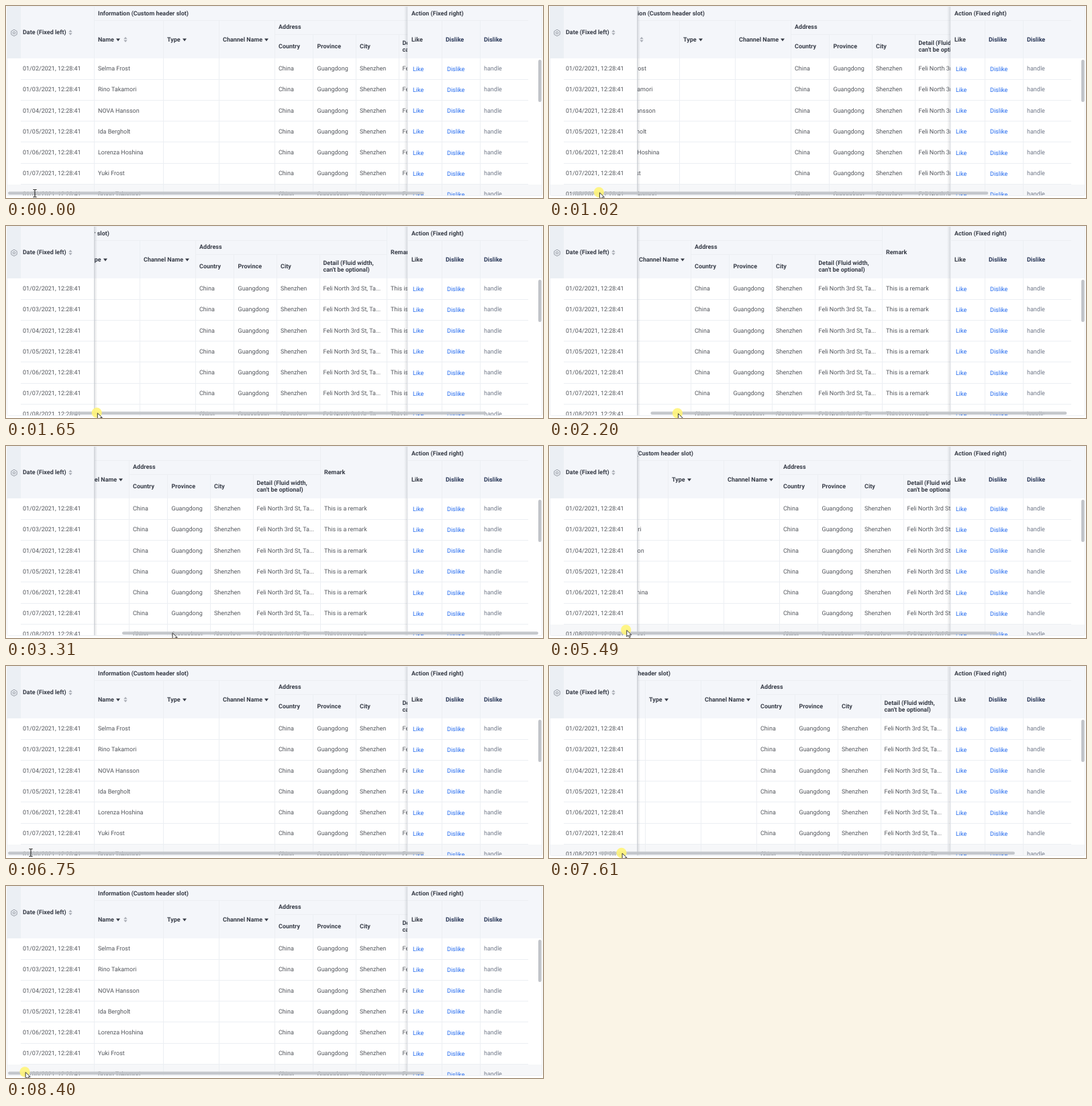
An HTML page for the animation above (8480 ms loop, 800 by 286 pixels).

```html
<!DOCTYPE html>
<html lang="en">
<head>
<meta charset="utf-8">
<title>Table with fixed columns</title>
<style>
  html, body { margin: 0; width: 800px; height: 286px; overflow: hidden; background: #fff; }
  svg { display: block; }
  text { font: 9px Roboto, sans-serif; fill: #53565c; white-space: pre; text-rendering: geometricPrecision; }
  .head { font-weight: 600; fill: #383d48; }
  .navy { font-weight: 600; fill: #2a3858; }
  .link { fill: #2068ee; }
  .soft { fill: #727a8a; }
  .rule { stroke: #eceff3; fill: none; }
  .bar { fill: #c1c4c9; }
</style>
</head>
<body>
<svg id="stage" width="800" height="286" viewBox="0 0 800 286"></svg>
<script>
const HEAD = 78, ROW = 31.2, LEFT = 131, RIGHT = 598, MAX_THUMB = 170, MAX_SCROLL = 217;
const STEPS = 108, LOOP = 8480, STEP = LOOP / STEPS;
const names = ['Selma Frost', 'Rino Takamori', 'NOVA Hansson', 'Ida Bergholt',
  'Lorenza Hoshina', 'Yuki Frost', 'Bruno Takamori'];

const label = (x, y, s, cls = '') => `<text x="${x}" y="${y + 3.2}" class="${cls}">${s}</text>`;
const head = (x, y, s) => label(x, y, s, 'head');
const box = (x, y, w, h, fill) => `<rect x="${x}" y="${y}" width="${w}" height="${h}" fill="${fill}"/>`;
const hLine = (x1, x2, y) => `<path class="rule" d="M${x1} ${Math.floor(y) + .5}H${x2}"/>`;
const vLine = (x, y1, y2 = 282) => `<path class="rule" d="M${x + .5} ${y1}V${y2}"/>`;
const caret = (x, y) => `<path fill="#343944" d="M${x - 3} ${y - 1.5}h6l-3 4z"/>`;
const sorter = (x, y) =>
  `<path fill="#a9adb5" d="M${x - 2.7} ${y - .8}h5.4l-2.7-3.2zM${x - 2.7} ${y + .8}h5.4l-2.7 3.2z"/>`;
const rows = cells => names.map((name, i) => cells(HEAD + 15 + i * ROW, name, i)).join('');
const rowLines = (x1, x2) => names.slice(1).map((_, i) => hLine(x1, x2, HEAD + (i + 1) * ROW)).join('');
const panel = (x, w) => box(x, 0, w, HEAD, '#f4f6fa') + box(x, HEAD, w, 205, '#fff') +
  `<rect class="hover" x="${x}" y="266" width="${w}" height="17" fill="#f6f7f9"/>`;

const middle = panel(LEFT, 684) + rowLines(LEFT, 815) +
  hLine(LEFT, 685, 21) + hLine(400, 685, 42) +
  [234, 317, 400].map(x => vLine(x, 21)).join('') +
  [457, 521, 585].map(x => vLine(x, 42)).join('') + vLine(685, 0) +
  head(137, 11, 'Information (Custom header slot)') +
  head(137, 50, 'Name') + caret(167, 50) + sorter(178, 50) +
  head(240, 50, 'Type') + caret(266, 50) +
  head(323, 50, 'Channel Name') + caret(388, 50) +
  head(406, 31, 'Address') + head(406, 60, 'Country') + head(463.5, 60, 'Province') +
  head(527, 60, 'City') + head(590.5, 55, 'Detail (Fluid width,') +
  head(590.5, 65, 'can\'t be optional)') + head(691, 39, 'Remark') +
  rows((y, name) => label(137, y, name) + label(406, y, 'China') + label(463.5, y, 'Guangdong') +
    label(527, y, 'Shenzhen') + label(590.5, y, 'Feli North 3rd St, Ta...') +
    label(691, y, 'This is a remark'));

const gear = `<g fill="none" stroke="#8d929c" stroke-width=".9"><circle cx="12" cy="40" r="1.7"/>
  <path d="M12 35.2l4.2 2.4v4.8L12 44.8l-4.2-2.4v-4.8z"/></g>`;
const leftPanel = panel(2, LEFT - 2) + box(2, 0, 20, HEAD, '#ebeff4') + gear + rowLines(22, LEFT) +
  vLine(LEFT, 0) + head(25, 39, 'Date (Fixed left)') + sorter(96, 39.5) +
  rows((y, _, i) => label(25, y, `01/0${i + 2}/2021, 12:28:41`));

const rightPanel = panel(RIGHT, 200) + rowLines(RIGHT, 778) + hLine(RIGHT, 778, 21) +
  vLine(RIGHT, 0) + vLine(649, 21) + vLine(706, 21) +
  head(604, 11, 'Action (Fixed right)') + head(604, 50, 'Like') +
  label(655, 50, 'Dislike', 'navy') + label(712, 50, 'Dislike', 'navy') +
  rows(y => label(606, y + .6, 'Like', 'link') + label(657, y + .6, 'Dislike', 'link') +
    label(712, y, 'handle', 'soft'));

const fade = (id, from, to) => `<linearGradient id="${id}">
  <stop stop-color="#39404d" stop-opacity="${from}"/>
  <stop offset="1" stop-color="#39404d" stop-opacity="${to}"/></linearGradient>`;

const $ = id => document.getElementById(id);
$('stage').innerHTML = `
  <defs>${fade('out', .18, 0)}${fade('in', 0, .15)}
    <clipPath id="table"><rect x="1" width="798" height="282.5"/></clipPath>
    <clipPath id="view"><rect x="${LEFT}" width="${RIGHT - LEFT}" height="283"/></clipPath></defs>
  <g clip-path="url(#table)">
    <g clip-path="url(#view)"><g id="middle">${middle}</g></g>
    ${leftPanel}${rightPanel}
    <g id="leftShade">${box(LEFT, 0, 5, 283, 'url(#out)')}</g>
    ${box(RIGHT - 5, 0, 5, 283, 'url(#in)')}
  </g>
  <path class="rule" d="M1.5 0V280.5q0 2 2 2H796.5q2 0 2-2V0M1 .5H799"/>
  <rect class="bar" x="793" y="80" width="4.6" height="63" rx="2.3"/>
  <rect class="bar" id="thumb" y="276.5" width="620" height="4.6" rx="2.3" opacity=".93"/>
  <g id="cursor">
    <circle id="press" cy=".3" r="7.6" fill="#fff47a" opacity=".9"/>
    <path id="arrow" transform="translate(.6 .5)" d="M.5 .5V10L2.8 8 4.3 11.3 6 10.5 4.6 7.3H7.6Z"
      fill="#fff" stroke="#222" stroke-width=".9"/>
    <path id="beam" d="M-2.5-5.5H-.7L0-5 .7-5.5H2.5M0-5V5M-2.5 5.5H-.7L0 5 .7 5.5H2.5" fill="none" stroke="#111"/>
  </g>`;

// Pointer path: step, x, y
const path = [[0, 43, 279], [2, 43, 277], [4, 43, 277], [8, 53, 277], [13, 74.3, 277], [14, 79, 277],
  [28, 191.4, 278.5], [35, 247, 277.5], [42, 247, 277.5], [47, 246, 278], [50, 246, 275.5],
  [56, 246, 275.5], [57, 240, 276], [58, 240, 276], [59, 218, 276], [60, 218, 276],
  [70, 114.7, 273.5], [76, 12, 263], [80, 12, 263], [83, 25, 252], [86, 37, 278], [91, 37, 278],
  [97, 108, 278], [99, 108, 278], [107, 28, 276.5]];

function pointer(n) {
  const i = Math.max(1, path.findIndex(p => p[0] >= n));
  const [a, b] = [path[i - 1], path[i]];
  const k = (n - a[0]) / (b[0] - a[0]);
  return [a[1] + (b[1] - a[1]) * k, a[2] + (b[2] - a[2]) * k];
}

const show = (el, on) => el.setAttribute('visibility', on ? 'visible' : 'hidden');
const hovers = document.querySelectorAll('.hover');

function draw(now) {
  const n = Math.min(STEPS - 1, Math.floor((now % LOOP + 7) / STEP));
  const [x, y] = pointer(n);
  const grab = n < 57 ? 43 : n < 78 ? 70 : 37;
  const offset = Math.min(MAX_THUMB, Math.max(0, x - grab));
  const scroll = Math.round(offset * MAX_SCROLL / MAX_THUMB);
  const typing = n < 2 || n >= 83 && n < 90;

  $('middle').setAttribute('transform', `translate(${-scroll})`);
  $('thumb').setAttribute('x', 3 + offset);
  $('cursor').setAttribute('transform', `translate(${x} ${y})`);
  show($('leftShade'), scroll > 0);
  show($('press'), n >= 2 && n < 42 || n >= 58 && n < 78 || n >= 90);
  show($('arrow'), !typing);
  show($('beam'), typing);
  hovers.forEach(el => show(el, y > 266 && x < LEFT));
  requestAnimationFrame(draw);
}
draw(performance.now());
</script>
</body>
</html>
```
